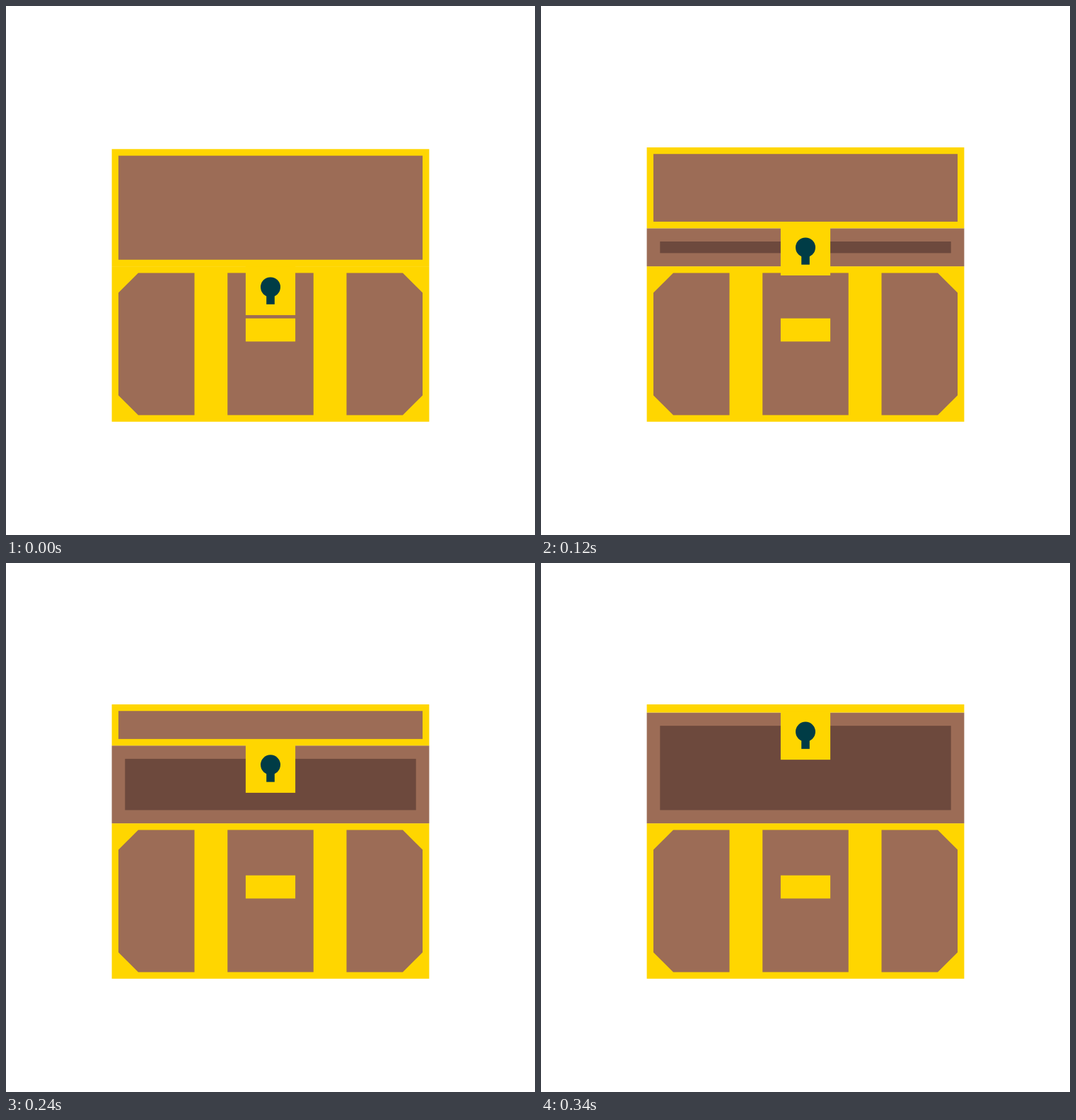
These frames come from a looping animation (748 px wide and 748 px high, 0.36 s). An HTML page with a canvas:

```html
<!DOCTYPE html>
<html lang="en">
<head>
<meta charset="utf-8">
<title>Treasure chest</title>
<style>
  html, body { margin: 0; height: 100%; overflow: hidden; background: #fff; }
  canvas { display: block; }
</style>
</head>
<body>
<canvas id="stage" width="748" height="748"></canvas>
<script>
const ctx = document.getElementById('stage').getContext('2d');
const GOLD = '#ffd600', WOOD = '#9c6c56', DARK = '#6d493d', HOLE = '#003c46';
const U = 9.35, STEP = 20, STEPS = 18;
const LEFT = 16 * U, RIGHT = 64 * U, RIM = 368.1, BASE = 587.8;

function box(color, x1, y1, x2, y2) {
  if (y2 <= y1) return;
  ctx.fillStyle = color;
  ctx.fillRect(x1, y1, x2 - x1, y2 - y1);
}

// Side panel with its two outer corners cut off
function sidePanel(inner, outer) {
  const top = RIM + U, bottom = BASE - U, cut = 3 * U;
  const bevel = outer + Math.sign(inner - outer) * cut;
  ctx.fillStyle = WOOD;
  ctx.beginPath();
  ctx.moveTo(inner, top);
  ctx.lineTo(bevel, top);
  ctx.lineTo(outer, top + cut);
  ctx.lineTo(outer, bottom - cut);
  ctx.lineTo(bevel, bottom);
  ctx.lineTo(inner, bottom);
  ctx.fill();
}

function drawBody() {
  box(GOLD, LEFT, RIM, RIGHT, BASE);
  sidePanel(28.5 * U, LEFT + U);
  sidePanel(51.5 * U, RIGHT - U);
  box(WOOD, 33.5 * U, RIM + U, 46.5 * U, BASE - U);
  box(GOLD, 338.9, 441.7, 409.1, 474.4);
}

function drawLid(top, bottom) {
  box(WOOD, LEFT, bottom, RIGHT, RIM);
  box(DARK, LEFT + 2 * U, bottom + 2 * U, RIGHT - 2 * U, RIM - 2 * U);
  box(GOLD, LEFT, top, RIGHT, bottom);
  box(WOOD, LEFT + U, top + U, RIGHT - U, bottom - U);
}

function drawLock(top, bottom) {
  box(GOLD, 338.9, top, 409.1, bottom);
  box(HOLE, 368.2, bottom - 39.6, 379.8, bottom - 15.3);
  ctx.beginPath();
  ctx.arc(374, bottom - 39.6, 14, 0, 2 * Math.PI);
  ctx.fill();
}

function draw(now) {
  const step = Math.floor(now / STEP) % STEPS;
  const lift = step * U;
  const lidBottom = step ? 370.4 - lift : RIM;
  ctx.clearRect(0, 0, 748, 748);
  drawBody();
  drawLid(step ? 199.9 : 202.3, lidBottom);
  drawLock(lidBottom - 1, 437.1 - lift);
  requestAnimationFrame(draw);
}
requestAnimationFrame(draw);
</script>
</body>
</html>
```
